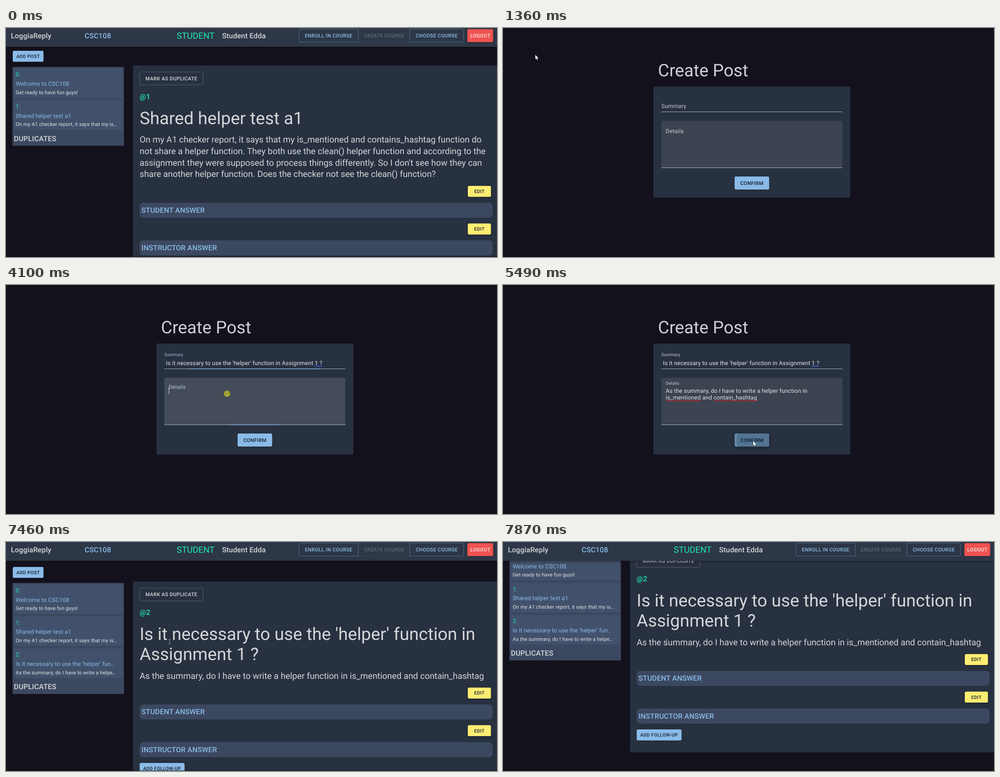
An HTML page with a canvas for the animation above (8000 ms loop, 1093x512 px).

```html
<!DOCTYPE html>
<html lang="en">
<head>
<meta charset="utf-8">
<title>Course forum</title>
<style>
  html, body { margin: 0; width: 100%; height: 100%; overflow: hidden; background: #13111c; }
  canvas { display: block; }
</style>
</head>
<body>
<canvas id="stage" width="1093" height="512"></canvas>
<script>
const ctx = document.getElementById('stage').getContext('2d');
const LOOP = 8000, W = 1093, H = 512;

const BG = '#13111c', BAR = '#2d3747', PANEL = '#283140', CARD = '#3c4860', ITEM = '#42516b';
const TEXT = '#d5d6d9', TEAL = '#1de9b6', BLUE = '#8abbe8', INK = '#17202c', EDGE = '#5a7b9b';
const BLUE_RGB = [138, 187, 232], HOVER_RGB = [95, 136, 173], GREY_RGB = [197, 200, 205];

// weight, size, letter spacing in em
const ZOOM = .805;
const h3 = [400, 48 * ZOOM, 0], h5 = [400, 24 * ZOOM, 0], h6 = [500, 20 * ZOOM, .0075];
const body = [400, 16 * ZOOM, .0094], small = [400, 14 * ZOOM, .0107];
const button = [500, 14 * ZOOM, .0286], smallButton = [500, 13 * ZOOM, .0286];
const TITLE_LINE = 45, TEXT_LINE = 25.75;

// moments of the story
const ADD = 1200, FORM = 1340, SUMMARY = 2670, PASTE1 = 3020, DETAILS = 4081,
  PASTE2 = 4530, CONFIRM = 5190, BACK = 5640, OPEN = 6560, SCROLL = 7590;

const posts = [
  { title: ['Welcome to CSC108'], text: ['Get ready to have fun guys!'], answer: 'Very Excited!',
    item: ['Welcome to CSC108', 'Get ready to have fun guys!'] },
  { title: ['Shared helper test a1'],
    text: ['On my A1 checker report, it says that my is_mentioned and contains_hashtag function do',
      'not share a helper function. They both use the clean() helper function and according to the',
      "assignment they were supposed to process things differently. So I don't see how they can",
      'share another helper function. Does the checker not see the clean() function?'],
    item: ['Shared helper test a1', 'On my A1 checker report, it says that my is…'] },
  { title: ["Is it necessary to use the 'helper' function in", 'Assignment 1 ?'],
    text: ['As the summary, do I have to write a helper function in is_mentioned and contain_hashtag'],
    item: ["Is it necessary to use the 'helper' fun…", 'As the summary, do I have to write a helpe…'] }
];

// pointer path: time, x, y
const path = [
  [100, 985, 514], [880, 72, 60], [1430, 72, 60], [1670, 500, 73], [2300, 500, 73], [2450, 520, 174],
  [3020, 520, 174], [3180, 690, 8], [3300, 748, 33], [3700, 748, 33], [4040, 492, 243],
  [4560, 492, 243], [4900, 556, 362], [5150, 557, 349], [6180, 557, 349], [6410, 124, 281],
  [6650, 124, 281], [6900, 330, 250], [7160, 330, 250], [7430, 364, 223]
];

const ramp = (t, from, span) => Math.min(1, Math.max(0, (t - from) / span));
const smooth = u => u * u * (3 - 2 * u);
const easeOut = u => 1 - (1 - u) ** 3;
const lerp = (a, b, u) => a + (b - a) * u;
const mix = (a, b, u) => `rgb(${a.map((v, i) => Math.round(lerp(v, b[i], u)))})`;

function pointer(t) {
  let i = path.findIndex(p => p[0] > t);
  if (i < 0) i = path.length;
  if (i === 0) return [-50, -50];
  const a = path[i - 1], b = path[i] || a;
  const u = a === b ? 0 : smooth(ramp(t, a[0], b[0] - a[0]));
  return [lerp(a[1], b[1], u), lerp(a[2], b[2], u)];
}

function rect(x, y, w, h, color, r = 0) {
  ctx.fillStyle = color;
  ctx.beginPath();
  ctx.roundRect(x, y, w, h, r);
  ctx.fill();
}

function outline(x, y, w, h, color, r) {
  ctx.strokeStyle = color;
  ctx.lineWidth = .8;
  ctx.beginPath();
  ctx.roundRect(x, y, w, h, r);
  ctx.stroke();
}

// y is the middle of the capitals
function text(str, x, y, [weight, size, spacing], color, align = 'left') {
  ctx.font = `${weight} ${size}px Roboto, sans-serif`;
  ctx.letterSpacing = spacing * size + 'px';
  ctx.textRendering = 'geometricPrecision';
  ctx.textAlign = align;
  ctx.fillStyle = color;
  ctx.fillText(str, x, y + size * .3555);
}

function shadow(blur, dy, alpha) {
  ctx.shadowBlur = blur;
  ctx.shadowOffsetY = dy;
  ctx.shadowColor = `rgba(0,0,0,${alpha})`;
}

function solidButton(label, x, mid, w, h, style, color, hover = 0, ink = INK) {
  shadow(4 + 4 * hover, 1.2 + hover, .3);
  rect(x, mid - h / 2, w, h, color, 3.2);
  shadow(0, 0, 0);
  text(label, x + w / 2, mid, style, ink, 'center');
}

function ripple(t, start, cx, cy, x, y, w, h) {
  if (t < start) return;
  const u = ramp(t, start, 550);
  ctx.save();
  ctx.beginPath();
  ctx.roundRect(x, y, w, h, 3.2);
  ctx.clip();
  ctx.beginPath();
  ctx.arc(cx, cy, 46 * (1 - (1 - u) ** 2), 0, 7);
  ctx.fillStyle = 'rgba(0,0,0,.15)';
  ctx.fill();
  ctx.restore();
}

function header() {
  shadow(5, 2, .35);
  rect(0, -10, W, 52, BAR);
  shadow(0, 0, 0);
  text('LoggiaReply', 11, 17, h6, TEXT);
  text('CSC108', 175, 17, h6, BLUE);
  text('STUDENT', 380, 17, h5, TEAL);
  text('Student Edda', 481, 17, h6, TEXT);
  outline(784, 2.5, 115, 29, '#3d4857', 0);
  outline(652.5, 2.5, 131.5, 29, EDGE, [3, 0, 0, 3]);
  outline(899, 2.5, 119.5, 29, EDGE, [0, 3, 3, 0]);
  text('ENROLL IN COURSE', 718.3, 17, button, BLUE, 'center');
  text('CREATE COURSE', 841.6, 17, button, '#606975', 'center');
  text('CHOOSE COURSE', 958.8, 17, button, BLUE, 'center');
  solidButton('LOGOUT', 1027, 17, 57.5, 29.2, button, '#ef5350', 0, '#f3e9ea');
}

function sidebar(count) {
  const pitch = 71.7;
  rect(14.5, 91.6, 248, 33 + count * pitch, CARD);
  for (let i = 0; i < count; i++) {
    const y = i * pitch;
    rect(17.5, 95 + y, 242, 65.6, ITEM);
    text(i + ':', 21.5, 108.5 + y, body, TEAL);
    text(posts[i].item[0], 21.5, 129 + y, body, BLUE);
    text(posts[i].item[1], 21.5, 148.4 + y, small, '#e2e3e6');
  }
  text('DUPLICATES', 17.5, 108.1 + count * pitch, h6, TEXT);
}

function answer(label, y, reply) {
  rect(297.5, y, 785.5, reply ? 59.2 : 33.6, CARD, 8);
  text(label, 301.5, y + 16.5, h6, BLUE);
  if (reply) text(reply, 301.5, y + 42, h5, TEXT);
}

function postPanel(id) {
  const post = posts[id];
  const edit = y => solidButton('EDIT', 1028, y, 51.5, 24.6, smallButton, '#feed72');
  const titleExtra = (post.title.length - 1) * TITLE_LINE;
  const extra = titleExtra + (post.text.length - 1) * TEXT_LINE;
  const replyEnd = 351.8 + extra + (post.answer ? 25.6 : 0);
  rect(283, 88.5, 810, replyEnd + 60, PANEL);
  outline(297.5, 103, 141, 28.8, '#656d79', 3.2);
  text('MARK AS DUPLICATE', 368, 117.4, button, TEXT, 'center');
  text('@' + id, 297.5, 157.5, h6, TEAL);
  post.title.forEach((line, i) => text(line, 297.5, 205.6 + i * TITLE_LINE, h3, TEXT));
  post.text.forEach((line, i) => text(line, 297.5, 254 + titleExtra + i * TEXT_LINE, h5, TEXT));
  edit(292.7 + extra);
  answer('STUDENT ANSWER', 318.2 + extra, post.answer);
  edit(replyEnd + 25);
  answer('INSTRUCTOR ANSWER', replyEnd + 50.5);
  solidButton('ADD FOLLOW-UP', 297.5, replyEnd + 109.6, 100, 24.6, smallButton, BLUE);
}

function forum(t) {
  const first = t < FORM;
  const scroll = first ? 4.7 : 75 * smooth(ramp(t, SCROLL, 270));
  const hover = first ? ramp(t, 800, 200) : 0;
  ctx.save();
  ctx.translate(0, -scroll);
  solidButton('ADD POST', 15, 68, 68.5, 24.6, smallButton, mix(BLUE_RGB, HOVER_RGB, hover), hover);
  if (first) ripple(t, ADD, 72, 65, 15, 55.7, 68.5, 24.6);
  sidebar(first ? 2 : 3);
  postPanel(first ? 1 : t < OPEN ? 0 : 2);
  ctx.restore();
  header();
}

// label that shrinks when its field is used
function fieldLabel(str, x, y, smallY, shrink, focus) {
  const size = 16 * ZOOM * lerp(1, .75, shrink);
  text(str, x, lerp(y, smallY, shrink), [400, size, .0094], mix(GREY_RGB, BLUE_RGB, focus));
}

function underline(y, focus, hover) {
  rect(352.5, y, 403, hover ? 1.6 : .9, '#b4b8be');
  if (focus > 0) rect(554 - 201.5 * focus, y - .3, 403 * focus, 1.6, BLUE);
}

function caret(t, since, x, y) {
  if (Math.floor((t - since) / 490) % 2 === 0) rect(x, y, 1, 15, '#e6e7e9');
}

function form(t, [px, py]) {
  const over = (y, h) => px > 352 && px < 756 && py > y && py < y + h;
  const shrink1 = easeOut(ramp(t, SUMMARY, 200)), shrink2 = easeOut(ramp(t, DETAILS, 200));
  const focus1 = shrink1 - shrink2;
  const focus2 = shrink2 - easeOut(ramp(t, CONFIRM, 200));

  text('Create Post', 345, 94.6, h3, '#d0d0d3');
  rect(335, 131, 438, 248, PANEL);

  underline(187, focus1, over(162, 26) && focus1 === 0);
  fieldLabel('Summary', 352.5, 174.8, 155.3, shrink1, focus1);
  if (t >= PASTE1) text("Is it necessary to use the 'helper' function in Assignment 1 ?", 356.1, 174.3, body, '#e2e3e6');
  if (t >= 3300) {
    rect(687, 180, 17, 1, '#3f55d8');
    rect(687, 182, 17, 1, '#3f55d8');
  }
  if (t >= SUMMARY && t < DETAILS) {
    if (t < PASTE1) caret(t, SUMMARY, 353, 167);
    else caret(t, PASTE1 - 10, 703.5, 167);
  }

  const hover2 = over(207, 105);
  rect(352.5, 207.5, 403, 105, `rgba(255,255,255,${hover2 ? .13 : .095})`, [3.2, 3.2, 0, 0]);
  underline(312, focus2, false);
  fieldLabel('Details', 362.2, 230.2, 219.8, shrink2, focus2);
  if (t >= PASTE2) {
    text('As the summary, do I have to write a helper function in', 362.2, 236.5, body, '#e2e3e6');
    text('is_mentioned and contain_hashtag', 362.2, 251.7, body, '#e2e3e6');
    rect(362.5, 258, 78, 1.4, '#c4232c');
    rect(469, 258, 96.5, 1.4, '#c4232c');
  }
  if (t >= DETAILS && t < CONFIRM) {
    if (t < PASTE2) caret(t, DETAILS, 362.3, 229);
    else caret(t, PASTE2, 565.5, 244);
  }

  const hover = ramp(t, 4780, 250);
  solidButton('CONFIRM', 515.5, 346.7, 77, 29.2, button, mix(BLUE_RGB, HOVER_RGB, hover), hover);
  ripple(t, CONFIRM, 557, 347, 515.5, 332.1, 77, 29.2);
  return over(162, 26) || hover2;
}

function drawPointer(t, [x, y], beam) {
  if ([ADD, SUMMARY, DETAILS - 15, CONFIRM, OPEN - 60].some(c => t >= c && t < c + 110)) {
    ctx.fillStyle = 'rgba(200,196,20,.72)';
    ctx.beginPath();
    ctx.arc(x, y, 7.2, 0, 7);
    ctx.fill();
  }
  if (beam) {
    rect(x - .4, y - 5, .9, 10, '#a9adb3');
    rect(x - 2, y - 5.5, 4, .8, '#a9adb3');
    rect(x - 2, y + 4.8, 4, .8, '#a9adb3');
    return;
  }
  ctx.save();
  ctx.translate(x, y);
  const shape = new Path2D('M0 0V10L2.3 8L4 11.8L5.6 11.1L4 7.5L7 7.2Z');
  ctx.lineWidth = 1;
  ctx.strokeStyle = '#000';
  ctx.stroke(shape);
  ctx.fillStyle = '#fff';
  ctx.fill(shape);
  ctx.restore();
}

function draw(t) {
  const p = pointer(t);
  let beam = t > OPEN && p[0] > 297;
  rect(0, 0, W, H, BG);
  if (t >= FORM && t < BACK) beam = form(t, p);
  else forum(t);
  rect(0, 510.5, W, 1.5, 'rgba(12,10,18,.6)');
  drawPointer(t, p, beam);
}

const start = performance.now();
function tick() {
  draw((performance.now() - start) % LOOP);
  requestAnimationFrame(tick);
}
tick();
</script>
</body>
</html>
```
